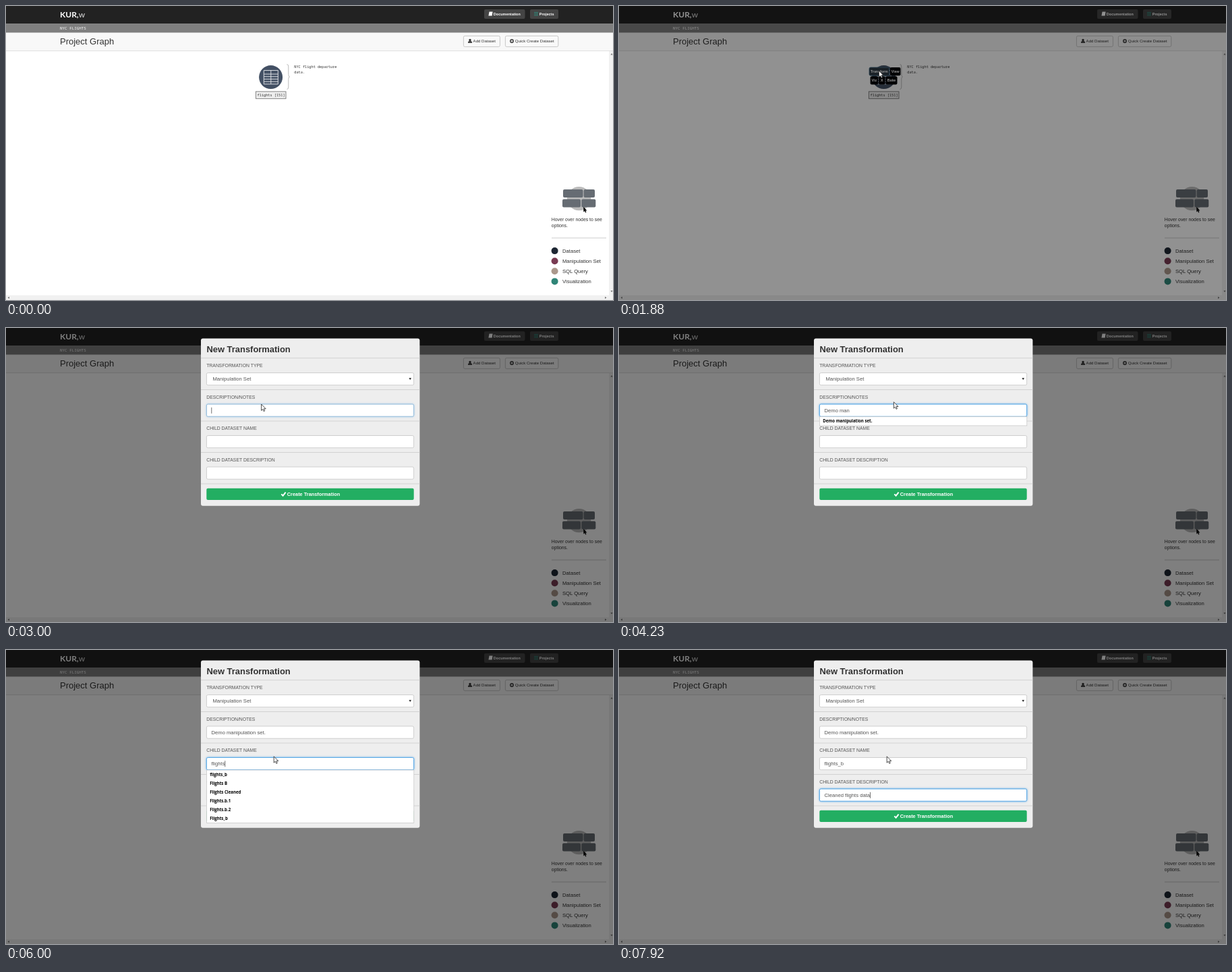
Recreate the animation shown at these times as an HTML page. Size 900 px wide and 436 px high, loop 8 s.

```html
<!DOCTYPE html>
<html lang="en">
<head>
<meta charset="utf-8">
<title>Project Graph</title>
<style>
html, body { margin: 0; width: 100%; height: 100%; overflow: hidden; background: #fff; }
svg { display: block; width: 900px; height: 436px; font-family: "Liberation Sans", Arial, sans-serif; fill: #333; }
.mono { font-family: "Noto Sans Mono", "DejaVu Sans Mono", monospace; font-size: 5.25px; }
.b { font-weight: 700; }
.w { fill: #fff; }
.list { font: 700 6.1px "Open Sans", "Noto Sans", sans-serif; fill: #000; }
.line { fill: none; stroke: #ccc; stroke-width: .8; }
.field { fill: #fff; stroke: #c4c4c4; stroke-width: .8; }
.glow { fill: #fff; stroke: #59a9e6; filter: drop-shadow(0 0 1.5px #66afe9); }
</style>
</head>
<body>
<svg viewBox="0 0 900 436" xmlns="http://www.w3.org/2000/svg">
  <g id="page"></g>
  <g id="hover"></g>
  <rect id="shade" width="900" height="436" fill="#000"/>
  <g id="modal"></g>
  <path id="mouse" d="M0 0V9.4L2.1 7.4 3.6 10.6 5.1 9.9 3.7 6.8H6.6Z" fill="#fff" stroke="#222" stroke-width=".8"/>
</svg>
<script>
const LOOP = 8000;
const $ = id => document.getElementById(id);
const rect = (x, y, w, h, fill, r = 0, more = '') =>
  `<rect x="${x}" y="${y}" width="${w}" height="${h}" rx="${r}" fill="${fill}" ${more}/>`;
const text = (x, y, size, s, more = '') =>
  `<text x="${x}" y="${y}" font-size="${size}" xml:space="preserve" ${more}>${s}</text>`;
const circle = (x, y, r, fill) => `<circle cx="${x}" cy="${y}" r="${r}" fill="${fill}"/>`;
const path = (d, fill, more = '') => `<path d="${d}" fill="${fill}" ${more}/>`;
const BOLD = 'class="b"', WHITE = 'class="b w"', MONO = 'class="mono"';

// Latest entry whose time has come
const at = (list, t) => list.findLast(e => e[0] <= t);

function drawPage() {
  const edge = 'stroke="#bbb" stroke-width=".8"';
  const header = rect(0, 0, 900, 26.5, '#222') + rect(0, 26.5, 900, 13, '#7f7f7f') +
    rect(0, 40, 900, 26, '#f8f8f8') + rect(0, 66, 900, 1, '#e0e0e0') +
    `<text x="80" y="17" font-family="Lato, sans-serif" font-size="12" class="w"><tspan class="b">KUR,</tspan><tspan font-weight="400" fill="#ddd">w</tspan></text>` +
    text(80, 35, 0, 'NYC FLIGHTS', 'class="mono w" style="font-size:5.9px"') +
    text(80, 57, 13, 'Project Graph') +
    rect(709, 5, 60.5, 14, '#444', 2) + rect(777, 5, 42, 14, '#444', 2) +
    path('M716.5 8.6H721.6L720.6 14.6H715.4Z', '#fff') +
    text(722.8, 13.8, 5.5, 'Documentation', WHITE) +
    path('M783 9.5H789M783 11.7H789M783 13.9H789', 'none', 'stroke="#2f8577"') +
    text(790.8, 13.8, 5.5, 'Projects', WHITE) +
    rect(678.4, 44.4, 54, 16, '#f9f9f9', 2, edge) + rect(740.4, 44.4, 78.4, 16, '#f9f9f9', 2, edge) +
    circle(688, 50.5, 1.7, '#333') + path('M685 54.8V53Q688 51 691 53V54.8Z', '#333') +
    text(692.6, 54.4, 6.05, 'Add Dataset') +
    circle(750, 52, 2.9, '#333') + path('M748.2 52H751.8M750 50.2V53.8', 'none', 'stroke="#fff"') +
    text(754.8, 54.4, 6.05, 'Quick Create Dataset');

  const node = circle(392.6, 105.6, 17.5, '#435064') +
    path('M382.3 95.5H403.3V115.8H382.3ZM382.3 101H403.3M382.3 104.7H403.3M382.3 108.4H403.3M382.3 112.1H403.3M392.8 95.5V115.8',
      'none', 'stroke="#e8eaee" stroke-width=".9"') +
    path('M416.5 86.5Q418.8 86.5 418.8 90V101.5Q418.8 105 420.6 105Q418.8 105 418.8 108.5V120Q418.8 123.5 416.5 123.5',
      'none', 'stroke="#aaa" stroke-width=".8"') +
    rect(370.4, 126.9, 44.6, 10.4, '#eee', 0, 'stroke="#777" stroke-width=".9"') +
    text(372.6, 134, 0, 'flights [151]', MONO) +
    text(427.3, 92, 0, 'NYC flight departure', MONO) + text(427.3, 99.5, 0, 'data.', MONO);

  const bricks = [[826, 272, 29.5], [856.6, 272, 16.4], [825, 286.5, 27], [853.3, 286.5, 21]];
  const kinds = [['Dataset', '#1d2633'], ['Manipulation Set', '#793a52'], ['SQL Query', '#ab988c'], ['Visualization', '#2f8577']];
  const legend = circle(849.6, 285.6, 17.7, '#bbb') +
    bricks.map(([x, y, w]) => rect(x, y, w, 12, '#666c73', 2)).join('') +
    path('M856.3 297.8V305.4L858 303.9 859.2 306.6 860.4 306 859.3 303.5H861.4Z', '#000') +
    text(808.8, 319, 6.9, 'Hover over nodes to see') + text(808.8, 328, 6.9, 'options.') +
    path('M809 344H890', 'none', 'stroke="#ccc"') +
    kinds.map(([name, fill], i) =>
      circle(813.6, 363.1 + i * 15.1, 5, fill) + text(825, 365.6 + i * 15.1, 7.65, name)).join('');

  const scroll = rect(894, 67, 6, 369, '#f1f1f1') + rect(0, 429, 900, 7, '#f1f1f1') +
    path('M896.4 72.5L898 70 899.6 72.5ZM896.4 422L898 424.5 899.6 422ZM5 431L2.5 432.6 5 434.2ZM888 431L890.5 432.6 888 434.2Z', '#777');

  $('page').innerHTML = header + node + legend + scroll;
}

function hoverButtons(active) {
  const buttons = [['Transform', 371, 91, 29.7], ['View', 402, 91, 15.5], ['Viz', 372.6, 104.3, 11.6],
    ['X', 385.2, 104.3, 9.3], ['Bake', 395.5, 104.3, 17]];
  return buttons.map(([name, x, y, w], i) => {
    const on = active && !i;
    return rect(x, y, w, 12.2, on ? '#2d3a45' : '#050608', 2, on ? 'stroke="#4a7590" stroke-width=".8"' : '') +
      text(x + w / 2, y + 7.9, 5.3, name, 'class="b w" text-anchor="middle"');
  }).join('');
}

const mouse = [
  [0, -20, 0], [310, 836, 427], [420, 821, 370], [530, 801, 302], [640, 777, 232], [750, 748, 167], [860, 716, 120],
  [960, 690, 95], [1070, 670, 99], [1160, 465, 98.5], [1300, 440, 102], [1390, 418, 109], [1480, 399, 116],
  [1580, 389, 105], [1670, 386, 96.3], [1880, 385.4, 96], [2550, 383.5, 101], [2650, 381, 106], [2760, 379, 111],
  [2860, 378.6, 113], [3100, 394, 111.5], [3200, 407.4, 109.7], [4980, 405, 122], [5100, 401, 140],
  [5210, 398, 153], [5330, 397.2, 157.8]
];
const shade = [[0, 0], [1880, .43], [2010, .5]];
const slide = [[0, 0, 0], [2010, -31, .7], [2100, -10, 1], [2220, -1, 1], [2320, 0, 1]];
const focus = [[0, 0, 0], [3000, 1, .5], [3100, 1, 1], [5210, 2, .5], [5330, 2, 1], [6450, 3, .5], [6570, 3, 1]];
const caretOff = [[4230, 4310], [4420, 4540], [6820, 7050]];
const typed = [
  null,
  [[0, ''], [3420, 'D'], [3520, 'De'], [3660, 'Demo'], [3760, 'Demo '], [3900, 'Demo man'], [4310, 'Demo manipu'],
    [4540, 'Demo manipulation'], [4660, 'Demo manipulation set.']],
  [[0, ''], [5570, 'f'], [5670, 'fl'], [5910, 'fligh'], [6000, 'flights'], [6150, 'flights_b']],
  [[0, ''], [7050, 'C'], [7160, 'Cl'], [7280, 'Cleane'], [7510, 'Cleaned '], [7740, 'Cleaned fli'],
    [7830, 'Cleaned flight'], [7920, 'Cleaned flights data']]
];
const notes = ['Demo manipulation set.', 'Demo set', 'Data cleaning', 'Derived columns', 'Delay summary',
  'Drop the rows with missing departure times and convert the remaining columns to numbers for use'];
const names = ['flights_b', 'Flights B', 'Flights Cleaned', 'Flights.b.1', 'Flights.b.2', 'Flights_b'];
const menus = [
  [0, 0, []], [3420, 1, notes, 325], [3660, 1, notes.slice(0, 1)], [5210, 0, []], [5570, 2, names],
  [6150, 2, [names[0], names[5]]], [6450, 0, []],
  [7050, 3, ['Cleaned flights data.', 'Cleaned flights']], [7740, 0, []]
];
const labels = ['TRANSFORMATION TYPE', 'DESCRIPTION/NOTES', 'CHILD DATASET NAME', 'CHILD DATASET DESCRIPTION'];
const STEP = 46.5;

function field(label, i, t) {
  const y = 66.5 + i * STEP, [, active, strength] = at(focus, t);
  const on = active === i && strength > 0;
  const box = cls => rect(297.4, y, 307.2, 18.2, '#fff', 2, cls);
  let out = text(297.2, y - 8.4, 6.85, label, 'fill="#555"') + box('class="field"');
  if (on) out += box(`class="glow" opacity="${strength}"`);
  if (!i) return out + text(306.4, y + 11.8, 7.65, 'Manipulation Set', 'fill="#555"') +
    path('M597.5 74H601L599.2 77.3Z', '#333');
  const caret = on && !caretOff.some(([a, b]) => t >= a && t < b);
  // The caret rides along as a stroked empty-width mark after the text
  return out + text(304.5, y + 11.8, 7.65, at(typed[i], t)[1], `fill="#555" data-caret="${+caret}"`);
}

function menu([, i, items, width = 307.4]) {
  if (!items.length) return '';
  const top = 85 + i * STEP;
  return rect(297.4, top, width, items.length * 13 + .4, '#fff', 0, 'stroke="#c4c4c4" stroke-width=".7"') +
    items.map((s, k) => text(302.2, top + 8.5 + k * 13, 0, s, 'class="list"')).join('');
}

function drawModal(t) {
  const lines = [44.6, 91.5, 138, 184.5, 231].map(y => `M289 ${y}H613.4`).join('');
  $('modal').innerHTML = rect(289, 15.6, 324.4, 248.2, '#eee', 3) +
    path(lines, 'none', 'class="line"') +
    text(297.4, 35.5, 12.95, 'New Transformation', BOLD) +
    labels.map((s, i) => field(s, i, t)).join('') +
    rect(297.3, 237.7, 307.4, 17.4, '#23ae62', 2) +
    path('M408.3 246.4L410.6 248.8 414.6 243.6', 'none', 'stroke="#fff" stroke-width="2"') +
    text(416.8, 249, 7.35, 'Create Transformation', WHITE) +
    menu(at(menus, t));
  const live = $('modal').querySelector('[data-caret="1"]');
  if (live) {
    const x = 304.5 + live.getComputedTextLength();
    live.insertAdjacentHTML('afterend', rect(x, live.getAttribute('y') - 7, .7, 9, '#333'));
  }
}

let shown;
function frame(now) {
  const t = now % LOOP;
  const lists = [mouse, shade, slide, focus, menus, ...typed.slice(1), caretOff, caretOff.map(c => [c[1]])];
  const key = lists.map(l => l.filter(e => e[0] <= t).length).join();
  if (key !== shown) {
    shown = key;
    const [, x, y] = at(mouse, t), [, dy, alpha] = at(slide, t);
    $('mouse').setAttribute('transform', `translate(${x} ${y})`);
    $('shade').setAttribute('opacity', at(shade, t)[1]);
    $('hover').innerHTML = t >= 1390 ? hoverButtons(t >= 1670) : '';
    $('modal').setAttribute('transform', `translate(0 ${dy})`);
    $('modal').setAttribute('opacity', alpha);
    drawModal(t);
  }
  requestAnimationFrame(frame);
}

drawPage();
requestAnimationFrame(frame);
</script>
</body>
</html>
```
